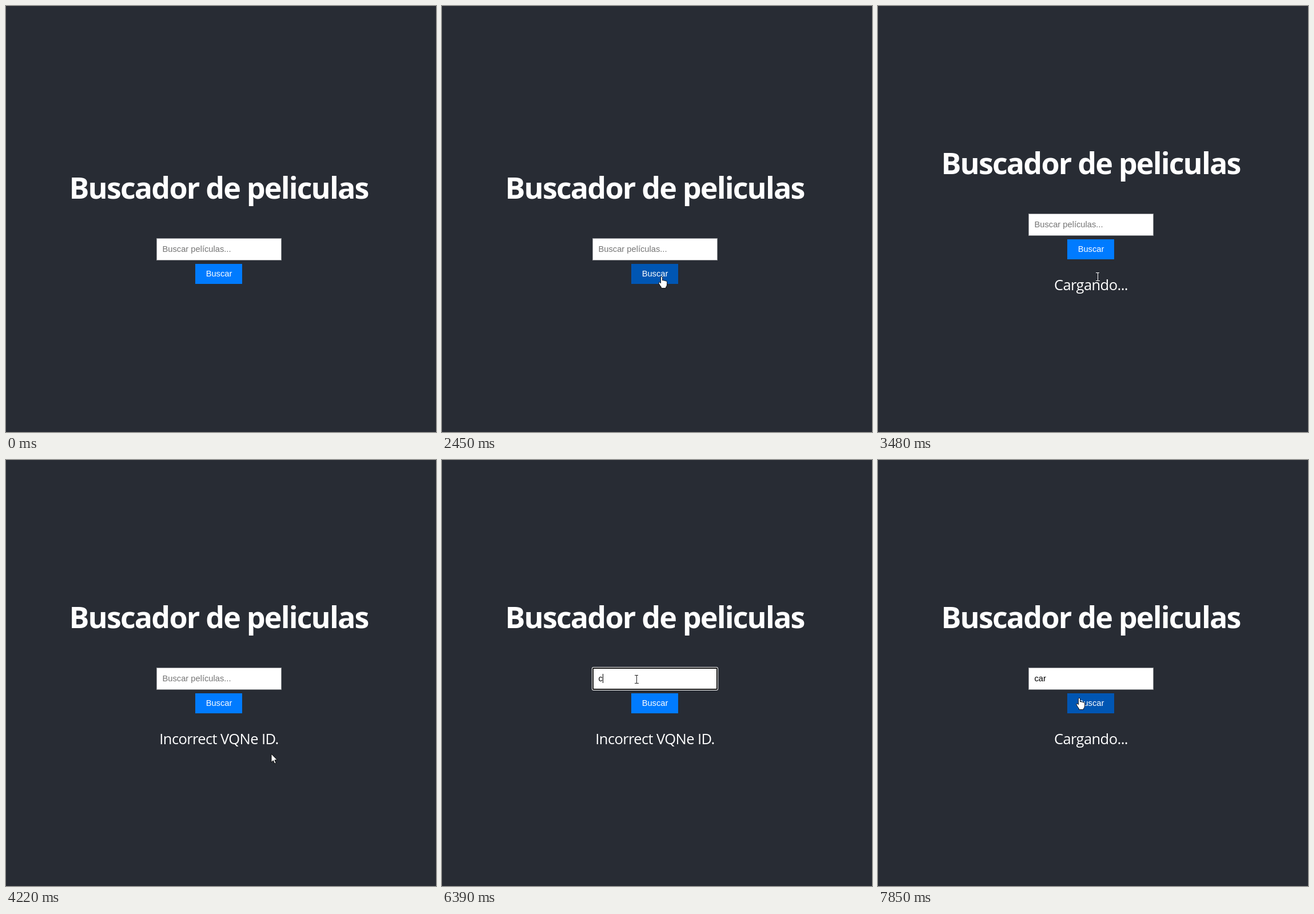
An HTML page that plays this animation: 752x745 px, repeating every 8000 ms.

```html
<!DOCTYPE html>
<html lang="es">
<head>
<meta charset="utf-8">
<title>Buscador de peliculas</title>
<style>
  html, body { margin: 0; width: 100%; height: 100%; overflow: hidden; background: #282c34; }
  svg { display: block; width: 752px; height: 745px; }
  text { white-space: pre; }
  .title { font: 700 52px "Open Sans", "Noto Sans", sans-serif; letter-spacing: -1.85px; fill: #fff; }
  .message { font: 400 25.5px "Open Sans", "Noto Sans", sans-serif; letter-spacing: -.6px; fill: #fff; }
  .field, .label { font: 14.7px "Liberation Sans", Arial, sans-serif; }
  .label { fill: #fff; }
</style>
</head>
<body>
<svg viewBox="0 0 752 745">
  <g id="form">
    <text class="title" x="372" y="337" text-anchor="middle">Buscador de peliculas</text>
    <rect id="box" x="263.5" y="406.5" width="218" height="38" fill="#fff"/>
    <g id="ring">
      <rect x="262" y="405" width="221" height="41" rx="3" fill="#fff"/>
      <rect x="263" y="406" width="219" height="39" rx="2" fill="#101010"/>
      <rect x="265" y="408" width="215" height="35" fill="#fff"/>
    </g>
    <text id="field" class="field" x="273.5" y="430"></text>
    <rect id="caret" y="417" width="1" height="16"/>
    <rect id="button" x="331" y="451" width="82" height="35"/>
    <text class="label" x="372.5" y="473" text-anchor="middle">Buscar</text>
  </g>
  <text id="message" class="message" x="372.5" y="497" text-anchor="middle"></text>
  <g id="cursor">
    <circle id="halo" r="11" fill="#fff000" fill-opacity=".5"/>
    <path id="arrow" d="M0 0V14.6L3.4 11.6L5.8 17L8.2 16L5.9 10.7H10.4Z" fill="#fff" stroke="#000" stroke-width=".9"/>
    <path id="beam" d="M-3 -7H3M.5 -7V7M-3 7H4" transform="translate(0 .5)" fill="none"/>
    <path id="hand" d="M-1.6 1.2Q0 -1 1.6 1.2V7Q3.2 5.6 4.4 7.4Q6 6.2 7.2 8Q9.4 7.2 9.6 9.6V14Q9.4 17 7.6 18.4V20.5H-.6V18.6Q-2.6 16.4 -5 12Q-5.4 9.2 -3.2 10L-1.6 11.8Z" fill="#fff" stroke="#000" stroke-width=".9"/>
    <path id="tick" d="M2.5 -1V8M0 8.5H5" stroke="#dfe8d0" fill="none"/>
  </g>
</svg>
<script>
const LOOP = 8000;
const ERROR = "Incorrect VQNe ID.", LOADING = "Cargando...";
const SEARCHED = 3480, FAILED = 3720, SEARCHED_AGAIN = 7600;

// Each move starts where the previous one ended.
const entry = { x: 752, y: 745 };
const moves = [
  { at: 190, ms: 790, x: 567, y: 450 },
  { at: 1010, ms: 750, x: 446, y: 422 },
  { at: 1860, ms: 720, x: 384, y: 473 },
  { at: 3520, ms: 700, x: 464, y: 514 },
  { at: 4400, ms: 430, x: 417, y: 487 },
  { at: 5010, ms: 800, x: 340, y: 383 },
  { at: 7000, ms: 720, x: 352, y: 416 }
];
const clicks = [3180, 5700, 7420], CLICK_MS = 300;
const keys = [6390, 6430, 6600], word = "car";

const $ = id => document.getElementById(id);
const set = (id, name, value) => $(id).setAttribute(name, value);
const show = (id, on) => set(id, "display", on ? "inline" : "none");
const within = (t, a, b) => t >= a && t < b;
const easeOut = k => 1 - (1 - k) ** 4;

function pointer(t) {
  let { x, y } = entry;
  for (const m of moves) {
    const k = easeOut(Math.min(1, Math.max(0, (t - m.at) / m.ms)));
    x += (m.x - x) * k;
    y += (m.y - y) * k;
  }
  return [Math.round(x), Math.round(y)];
}

function messageAt(t) {
  if (t < SEARCHED) return "";
  return within(t, FAILED, SEARCHED_AGAIN) ? ERROR : LOADING;
}

function drawForm(t, lift, overInput, overButton) {
  const focused = within(t, 5840, clicks[2]);
  const typed = word.slice(0, keys.filter(at => t >= at).length);
  const field = $("field");
  set("form", "transform", `translate(0 ${-lift})`);
  set("box", "stroke", overInput && !lift ? "#eee" : "#8a8c90");
  field.textContent = typed || "Buscar películas...";
  set("field", "fill", typed ? "#000" : "#757575");
  show("ring", focused);
  show("caret", focused);
  set("caret", "x", Math.round(273.5 + (typed && field.getComputedTextLength())));
  set("button", "fill", overButton ? "#0056b3" : "#007bff");
  $("message").textContent = messageAt(t);
}

function draw(t) {
  const lift = t < SEARCHED ? 0 : 43;
  const [x, y] = pointer(t);
  const inside = (x0, y0, x1, y1) => within(x, x0, x1) && within(y, y0, y1);
  const overInput = inside(263, 406 - lift, 482, 445 - lift);
  const overButton = inside(331, 451 - lift, 413, 486 - lift);
  const overText = lift > 0 && inside(268, 470, 477, 506);
  const pressed = clicks.some(at => within(t, at, at + CLICK_MS));
  const beam = overInput || overText;

  drawForm(t, lift, overInput, overButton);
  set("cursor", "transform", `translate(${x} ${y})`);
  show("cursor", t >= moves[0].at);
  show("halo", pressed);
  show("beam", beam);
  set("beam", "stroke", overText ? "#fff" : "#222");
  show("hand", overButton && !pressed);
  show("tick", overButton && pressed);
  show("arrow", !beam && !overButton);
}

const begin = performance.now();
function frame() {
  draw((performance.now() - begin) % LOOP);
  requestAnimationFrame(frame);
}
frame();
</script>
</body>
</html>
```
